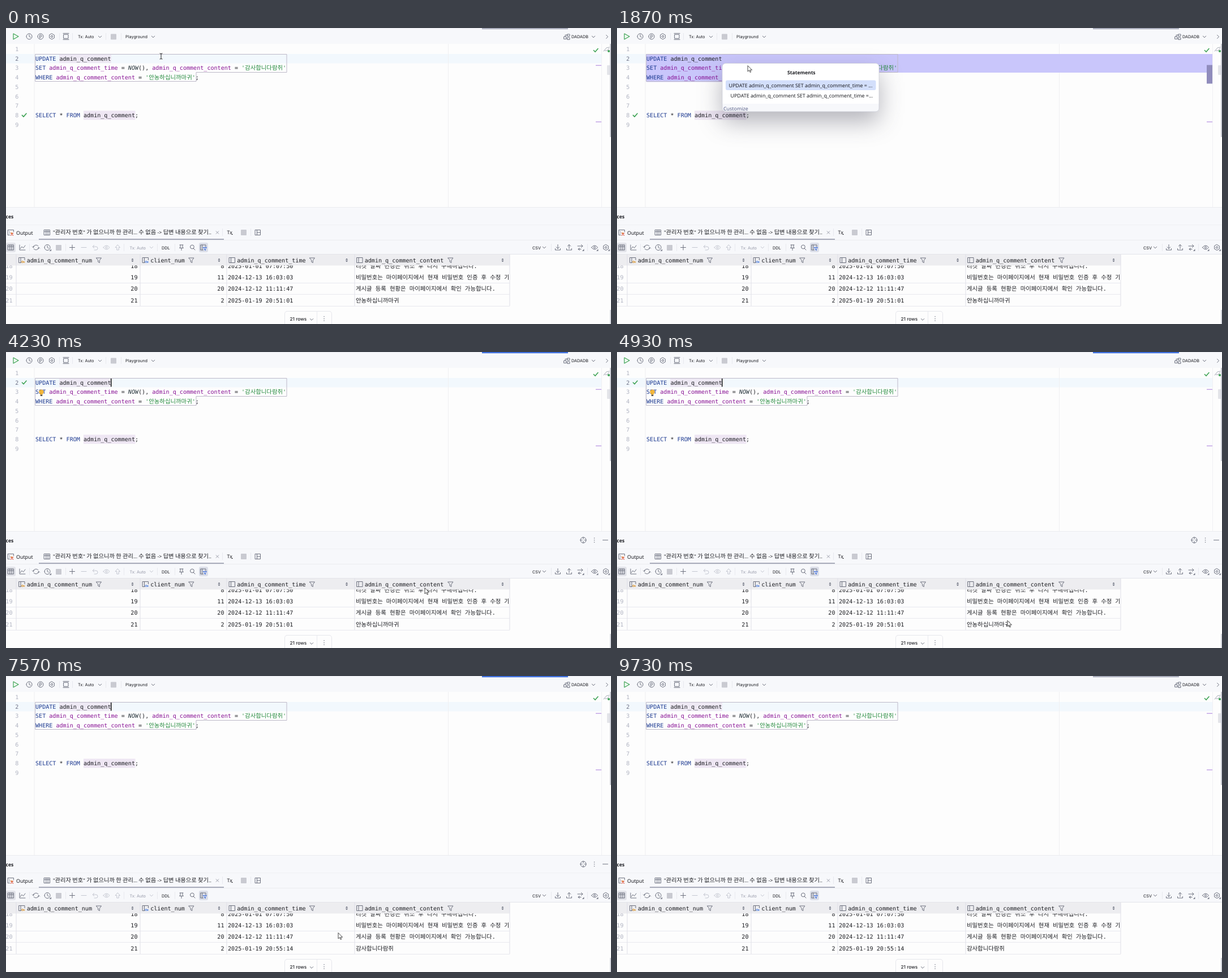
Write an HTML page with a canvas that moves like this. It is 1069x524 px and loops after 9.76 s.

```html
<!DOCTYPE html>
<html lang="ko">
<head>
<meta charset="utf-8">
<style>
  html, body { margin: 0; width: 100%; height: 100%; overflow: hidden; background: #fdfdfd; }
  canvas { display: block; }
</style>
</head>
<body>
<canvas id="stage" width="1069" height="524"></canvas>
<script>
const LOOP = 9760;
const ctx = document.getElementById('stage').getContext('2d');
ctx.textRendering = 'geometricPrecision'; // fractional advances at small sizes

// Moments at which the state of the window changes
const FOCUS = 500, POPUP_OPEN = 1150, EXECUTED = 2700, OUTPUT_READ = 3050, BULB_ON = 3500;
const REFRESHED = 6300, BLUR = 9400, BLINK = 530;

const INK = '#1c1d22', GREY = '#6c707e', FAINT = '#c4c7d1', PANEL = '#f7f8fb', EDITOR = '#fdfdfd';
const KEYWORD = '#1d3a91', COLUMN = '#871094', STRING = '#248a3d', GREEN = '#3fa355', BLUE = '#3f70df';

// Each kind has its fonts and the drop from the vertical centre to the baseline
const FONTS = {
  mono: { latin: '10.08px "DejaVu Sans Mono", monospace', hangul: '10.4px "Noto Sans CJK KR", sans-serif', drop: 3.7 },
  italic: { latin: 'italic 10.08px "DejaVu Sans Mono", monospace', drop: 3.7 },
  ui: { latin: '8.9px "Noto Sans", sans-serif', hangul: '10.3px "Noto Sans CJK KR", sans-serif', drop: 3.3 },
  bold: { latin: 'bold 8.6px "Noto Sans", sans-serif', drop: 3.3 },
  small: { latin: '7.3px Inter, sans-serif', drop: 2.7 },
  pager: { latin: '500 8.2px Inter, sans-serif', drop: 3.1 }
};

function rect(x, y, w, h, color, radius = 0) {
  ctx.fillStyle = color;
  ctx.beginPath();
  ctx.roundRect(x, y, w, h, radius);
  ctx.fill();
}

function icon(path, x, y, color = GREY, fill, width = 1) {
  ctx.save();
  ctx.translate(x, y);
  const shape = new Path2D(path);
  if (fill) { ctx.fillStyle = fill; ctx.fill(shape); }
  ctx.strokeStyle = color;
  ctx.lineWidth = width;
  ctx.lineJoin = ctx.lineCap = 'round';
  ctx.stroke(shape);
  ctx.restore();
}

// Draws mixed Latin and Hangul around the vertical centre y; returns the end x
function text(str, x, y, color = INK, kind = 'mono') {
  const { latin, hangul, drop } = FONTS[kind];
  ctx.fillStyle = color;
  for (const run of str.match(/[가-힣]+|[^가-힣]+/g)) {
    ctx.font = /[가-힣]/.test(run) ? hangul : latin;
    ctx.fillText(run, x, y + drop);
    x += ctx.measureText(run).width;
  }
  return x;
}

function textRight(str, x, y, color) {
  ctx.textAlign = 'right';
  text(str, x, y, color);
  ctx.textAlign = 'left';
}

const circle = r => `M${-r} 0a${r} ${r} 0 1 0 ${2 * r} 0a${r} ${r} 0 1 0 ${-2 * r} 0`;
const ICONS = {
  play: 'M-4-5L5 0L-4 5Z',
  clock: circle(5) + 'M0-3V0L2.5 1.5',
  param: circle(5) + 'M-1.3 3V-2.5H.5a1.6 1.6 0 0 1 0 3.4H-1.3',
  gear: 'M0-5L4.4-2.5V2.5L0 5L-4.4 2.5V-2.5Z' + circle(1.7),
  screen: 'M-4-3.5H4V3.5H-4ZM-5-5.5H5M-5 5.5H5',
  down: 'M-2.7-1.3L0 1.4L2.7-1.3',
  right: 'M-1.4-3L1.6 0L-1.4 3',
  check: 'M-3.6 0L-1 2.8L4-3',
  schema: 'M-5 0h4v4h-4zM1-4.5h4v3.5H1zM1 1.5h4V5H1zM-3 0v-3H1',
  output: 'M-5-4.5H5V4.5H-5ZM-3-2L-1 0L-3 2M0 2.5H2.5',
  table: 'M-5-4.5H5V4.5H-5ZM-5-1.5H5M-1.7-4.5V4.5M1.7-4.5V4.5',
  layout: 'M-4.5-4.5H4.5V4.5H-4.5ZM-1.5-4.5V4.5M-1.5 0H4.5',
  close: 'M-2.3-2.3L2.3 2.3M2.3-2.3L-2.3 2.3',
  chart: 'M-5-4.5V4.5H5M-3.5 2L-1-1.5L1.5 1L5-3.5',
  refresh: 'M-5 0A5 4.4 0 0 1 4-2.5M5 0A5 4.4 0 0 1-4 2.5M-6.5-1.5L-5 0L-3.2-1.5M3.2 1.5L5 0L6.5 1.5',
  plus: 'M-4.5 0H4.5M0-4.5V4.5',
  minus: 'M-4.5 0H4.5',
  undo: 'M-4-1.5H1.5A3 3 0 0 1 1.5 4.5H-1.5M-1.8-4L-4.5-1.5L-1.8 1',
  eye: 'M-5.5 0Q0-7 5.5 0Q0 7-5.5 0Z' + circle(1.6),
  submit: 'M0-4.5L4 0H1.7V4.5H-1.7V0H-4Z',
  pin: 'M-3-4.5H3M-2-4.5V-.5L-3.5 1H3.5L2-.5V-4.5M0 1V5',
  search: 'M-4-1a3.4 3.4 0 1 0 6.8 0a3.4 3.4 0 1 0-6.8 0M1.6 1.6L4.5 4.5',
  filterTable: 'M0 4.5H-5V-4.5H4.5V-1M-2-4.5V4.5',
  filterMark: 'M0 0H6L4 2.5V5L2 4V2.5Z',
  download: 'M0-5V2M-2.7-.7L0 2L2.7-.7M-4.5 2V4.5H4.5V2',
  upload: 'M0 2V-5M-2.7-2.3L0-5L2.7-2.3M-4.5 2V4.5H4.5V2',
  compare: 'M-5-2.5H4M1.5-5L4-2.5L1.5 0M1 3H-4M-1.5 1L-4 3L-1.5 5',
  corner: 'M0 0H-2.5L0-2.5Z',
  target: circle(5) + 'M0-5V-2M0 5V2M-5 0H-2M5 0H2',
  column: 'M-5-4.5H5V4.5H-5ZM-2-4.5V4.5',
  funnel: 'M-4.5-4H4.5L1.3 .3V4.5L-1.3 3V.3Z',
  sort: 'M-1.3-1.2L0-3L1.3-1.2ZM-1.3 1.2L0 3L1.3 1.2Z',
  bulb: 'M-2 2C-5-1-4-5 0-5S5-1 2 2V3H-2Z',
  arrow: 'M0 0V10L2.5 7.8L4.2 11.5L5.8 10.8L4.1 7.3H7.2Z',
  beam: 'M-2-5Q0-5 0-4Q0-5 2-5M0-4V4M-2 5Q0 5 0 4Q0 5 2 5'
};
const draw = (name, ...rest) => icon(ICONS[name], ...rest);

function dots(x, y) {
  for (let i = -1; i <= 1; i++) rect(x - .6, y + i * 3.6 - .6, 1.3, 1.3, GREY);
}

const isChoosing = t => t >= POPUP_OPEN && t < EXECUTED;
const isFocused = t => t >= FOCUS && t < BLUR && !isChoosing(t);

function caretVisible(t) {
  const restart = [REFRESHED, EXECUTED, FOCUS].find(time => time <= t);
  return isFocused(t) && (t - restart) % (2 * BLINK) < BLINK;
}

function topBar(t) {
  rect(0, 0, 1069, 28, PANEL);
  rect(0, 0, 1069, 1, '#ebecf0');
  rect(841, 0, 152, 2.3, isFocused(t) ? BLUE : '#a9acbb');
  draw('play', 17, 15, GREEN, '#f0faf2', 1.2);
  ['clock', 'param', 'gear'].forEach((name, i) => draw(name, 41 + 20 * i, 15));
  draw('screen', 106, 15);
  for (const x of [94, 117, 176, 203]) rect(x, 9, 1, 12, '#e8e9ee');
  text('Tx: Auto', 127, 15.5, INK, 'small');
  rect(185, 10.5, 10, 10, '#c9cad1', 1);
  text('Playground', 211, 15.5, INK, 'small');
  text('DADADB', 999, 15.5, INK, 'small');
  for (const x of [166, 260, 1038]) draw('down', x, 15.5);
  draw('schema', 991, 15.5);
  draw('right', 1062, 15.5);
}

const lineY = n => 37.3 + 16.72 * (n - 1);

function code(line, tokens) {
  let x = 52;
  for (const [str, color, kind] of tokens) x = text(str, x, lineY(line), color, kind);
}

function editor(t) {
  const choosing = isChoosing(t);
  rect(0, 28, 1069, 289, EDITOR);
  rect(0, 46, 1052, 16.5, '#f2f8fd');
  rect(49.5, 28, 1, 289, '#ededf1');
  rect(781, 28, 1, 289, '#f0f0f2');
  rect(1052, 28, 1, 289, '#f0f0f3');

  if (choosing) {
    rect(52, 46, 1000, 33, '#c9c6fb');
    rect(52, 79, 284, 16.5, '#c9c6fb');
  } else {
    rect(94, 46, 92, 16, '#eee9f4');
  }
  rect(137, 146.5, 91.5, 16, '#eee6f3');
  icon('M52.5 46.5H496.5V78.5H336.5V94.5H52.5Z', -.5, 0, '#bdb9c8');

  for (let n = 1; n <= 9; n++) textRight(String(n), 22.3, lineY(n), n === 2 ? '#71748a' : '#b1b4c2');
  code(2, [['UPDATE ', KEYWORD], ['admin_q_comment', INK]]);
  code(3, [['SET ', KEYWORD], ['admin_q_comment_time', COLUMN], [' = ', INK], ['NOW', '#25333b', 'italic'],
    ['(), ', INK], ['admin_q_comment_content', COLUMN], [' = ', INK], ["'감사합니다람쥐'", STRING]]);
  code(4, [['WHERE ', KEYWORD], ['admin_q_comment_content', COLUMN], [' = ', INK], ["'안농하십니까마귀'", STRING], [';', INK]]);
  code(8, [['SELECT ', KEYWORD], ['* ', INK], ['FROM ', KEYWORD], ['admin_q_comment;', INK]]);

  if (t < REFRESHED) draw('check', 32, lineY(t < EXECUTED ? 8 : 2), GREEN, null, 1.6);
  if (t > BULB_ON && t < REFRESHED) {
    draw('bulb', 62.5, 72, '#e9a51f', '#f2b63a', .8);
    rect(60.7, 75.5, 3.6, 2.5, '#5f5546', .5);
  }
  if (caretVisible(t)) rect(185, 47, 1.4, 14.5, '#000');

  draw('check', 1042, 39.5, GREEN, null, 1.6);
  if (choosing) rect(1042, 65.5, 10, 33, '#908cbc');
  else rect(1042, 65.5, 10, 1.5, '#c3a5e6');
  rect(1042, 165.5, 10, 1.5, '#c3a5e6');
  icon('M-5 3L0-3L5-4M-3 2H2L4-2', 1061, 38, '#a9adb8');
  rect(1063, 39, 4, 4, GREEN, 2);
  rect(1062, 66, 7, 17, '#e3e4e9', 1);
  rect(1067, 28, 2, 165, '#c9cbd3');
}

function panelBars(t, hovered) {
  rect(0, 317, 1069, 84, PANEL);
  rect(0, 317, 1069, 1, '#ebecf0');
  rect(0, 348, 1069, 1, '#f0f1f4');
  rect(0, 375, 1069, 1, '#ebecf0');
  text('ces', -.5, 334, INK, 'bold');
  if (hovered) {
    draw('target', 1020, 333);
    dots(1039.5, 333);
    draw('minus', 1059, 333);
  }

  draw('output', 8.5, 362);
  if (t < EXECUTED || t > OUTPUT_READ) {
    rect(7, 361, 7, 7, PANEL);
    icon('M-2-2L2 2M2-2L-2 2', 10.5, 365, '#dc5a48', null, 1.4);
    rect(9, 362, 2, 2, '#e9a14c');
  }
  text('Output', 18, 362.5, INK, 'ui');
  draw('table', 72.5, 362);
  text('"관리자 번호" 가 없으니까 한 관리... 수 없음 -> 답변 내용으로 찾기..', 83, 362, INK, 'ui');
  draw('close', 373.5, 362, '#9da0ac');
  rect(58, 373, 327, 2, '#a9acbb');
  rect(382, 355, 1, 13, '#e8e9ee');
  text('Tx', 390.5, 362, INK, 'ui');
  rect(398.5, 365, 2, 1, INK);
  rect(415, 357, 10, 10, '#c9cad1', 1);
  rect(432, 355, 1, 13, '#e8e9ee');
  draw('layout', 445, 362);
}

function gridToolbar() {
  const y = 388.5;
  rect(0, 380, 17, 17, '#e2e3e9', 3);
  rect(341, 380, 16, 17, '#dcdfe9', 3);
  [['table', 8.5], ['chart', 29], ['refresh', 53], ['clock', 73], ['plus', 117], ['pin', 310],
   ['search', 329.5], ['filterTable', 348.5], ['download', 975], ['upload', 995],
   ['compare', 1015], ['eye', 1040], ['gear', 1060]].forEach(([name, x]) => draw(name, x, y));
  draw('filterMark', 348.5, y, BLUE);
  for (const x of [79.5, 1021, 1046, 1066.5]) draw('corner', x, y + 6, GREY, GREY, .5);
  ['minus', 'undo', 'eye', 'submit'].forEach((name, i) => draw(name, 137.5 + 20 * i, y, FAINT));
  rect(88, 384, 10, 10, '#c9cad1', 1);
  for (const x of [41, 105, 208, 267, 298, 963, 1027]) rect(x, 382, 1, 13, '#e8e9ee');
  text('Tx: Auto', 218.5, y + .5, '#989baa', 'small');
  draw('down', 257, y, FAINT);
  text('DDL', 275, y + .5, INK, 'small');
  text('CSV', 930, y + .5, INK, 'small');
  draw('down', 951, y);
}

const ROWS = [
  ['18', '8', '2025-01-01 07:07:50', '티켓 날짜 변경은 취소 후 다시 구매하십니다.'],
  ['19', '11', '2024-12-13 16:03:03', '비밀번호는 마이페이지에서 현재 비밀번호 인증 후 수정 가능'],
  ['20', '20', '2024-12-12 11:11:47', '게시글 등록 현황은 마이페이지에서 확인 가능합니다.'],
  ['21', '2', '2025-01-19 20:51:01', '안농하십니까마귀']
];
const UPDATED_ROW = ['21', '2', '2025-01-19 20:55:14', '감사합니다람쥐'];
const HEADERS = [
  ['admin_q_comment_num', 28, 164, 223.5],
  ['client_num', 246.5, 327.5, 376.5],
  ['admin_q_comment_time', 399.5, 541, 602],
  ['admin_q_comment_content', 625, 785.5, 877.5]
];

function grid(t) {
  rect(0, 401, 1069, 123, EDITOR);
  ctx.save();
  ctx.beginPath();
  ctx.rect(0, 401, 888, 123);
  ctx.clip();
  ROWS.forEach((row, i) => {
    const y = 421 + 20.35 * i;
    const [num, client, time, content] = i === 3 && t > REFRESHED ? UPDATED_ROW : row;
    textRight(num, 11.5, y, '#b1b4c2');
    textRight(num, 232.5, y);
    textRight(client, 385.5, y);
    text(time, 392, y);
    text(content, 618, y);
  });
  ctx.restore();
  for (let i = 0; i < 3; i++) rect(0, Math.round(451 + 20.35 * i), 890, 1, '#e8e9ef');
  rect(0, 401, 890, 19.5, '#ededf0');
  rect(0, 400, 1069, 1, '#e4e5ea');
  for (const x of [17.5, 236.5, 389.5, 615.5, 889.5]) rect(x, 401, 1, 91, '#dfe0e7');

  HEADERS.forEach(([label, x, funnelX, sortX], i) => {
    draw('column', x, 411);
    if (i < 2) {
      rect(x - 1, 411, 7, 6, '#ededf0');
      icon(circle(1.5) + 'M1.5 0H4M3 0V1.5', x + 1, 414, i ? '#4d7fe0' : '#d9952f');
    }
    text(label, x + 8.7, 411);
    draw('funnel', funnelX, 411);
    draw('sort', sortX, 411, GREY, GREY, .7);
  });

  rect(492, 501, 84, 30, '#e6e7ec', 5);
  rect(493, 502, 82, 30, EDITOR, 4);
  rect(549, 502, 1, 22, '#e9eaee');
  text('21 rows', 501.5, 515, INK, 'pager');
  draw('down', 540, 516);
  dots(562, 514.5);
  rect(1067, 499, 2, 25, '#d3d5dc');
}

function popup(pointerY) {
  ctx.save();
  ctx.shadowColor = 'rgba(60, 60, 80, .38)';
  ctx.shadowBlur = 42;
  ctx.shadowOffsetY = 18;
  rect(186, 62.5, 277, 85.5, '#fff', 6);
  ctx.restore();
  rect(186, 134, 277, 14, PANEL, [0, 0, 6, 6]);
  icon('M6 0H271a6 6 0 0 1 6 6V79.5a6 6 0 0 1-6 6H6a6 6 0 0 1-6-6V6a6 6 0 0 1 6-6Z', 186, 62.5, '#c9cbd6', null, .7);
  rect(192, pointerY > 111 ? 111 : 92.5, 265.5, 17.5, '#d3dffb', 3);
  text('Statements', 301, 79, INK, 'bold');
  text('UPDATE admin_q_comment SET admin_q_comment_time = ...', 197.5, 102, INK, 'ui');
  text('UPDATE admin_q_comment SET admin_q_comment_time =...', 200.5, 120, INK, 'ui');
  text('Customize', 188, 142.5, '#59618a', 'ui');
}

// Pointer path: time, x, y
const PATH = [
  [0, 274, 50], [550, 274, 50], [1050, 16, 12], [1250, 16, 12], [1870, 231, 67], [2500, 277, 126],
  [3750, 277, 126], [4230, 740, 418], [4800, 720, 480], [5830, 41, 384], [6000, 50, 387],
  [6400, 50, 387], [7570, 587, 455], [8300, 600, 470], [9050, 700, 150], [9400, 740, -20], [LOOP, 740, -20]
];

function pointerAt(t) {
  const i = PATH.findIndex(([time]) => time > t);
  const [t0, x0, y0] = PATH[i - 1], [t1, x1, y1] = PATH[i];
  const u = (t - t0) / (t1 - t0), k = u * u * (3 - 2 * u);
  return [x0 + (x1 - x0) * k, y0 + (y1 - y0) * k];
}

function pointer(x, y, choosing) {
  const overPopup = choosing && x > 186 && x < 463 && y > 62 && y < 148;
  const overText = x > 50 && x < 1040 && y > 28 && y < 317 && !overPopup;
  if (overText) draw('beam', x, y, '#222');
  else draw('arrow', x, y, '#333', '#fff', .9);
}

const start = performance.now();

function frame() {
  const t = (performance.now() - start) % LOOP;
  const [x, y] = pointerAt(t);
  editor(t);
  topBar(t);
  panelBars(t, y > 317);
  gridToolbar();
  grid(t);
  if (isChoosing(t)) popup(y);
  pointer(x, y, isChoosing(t));
  requestAnimationFrame(frame);
}
frame();
</script>
</body>
</html>
```
